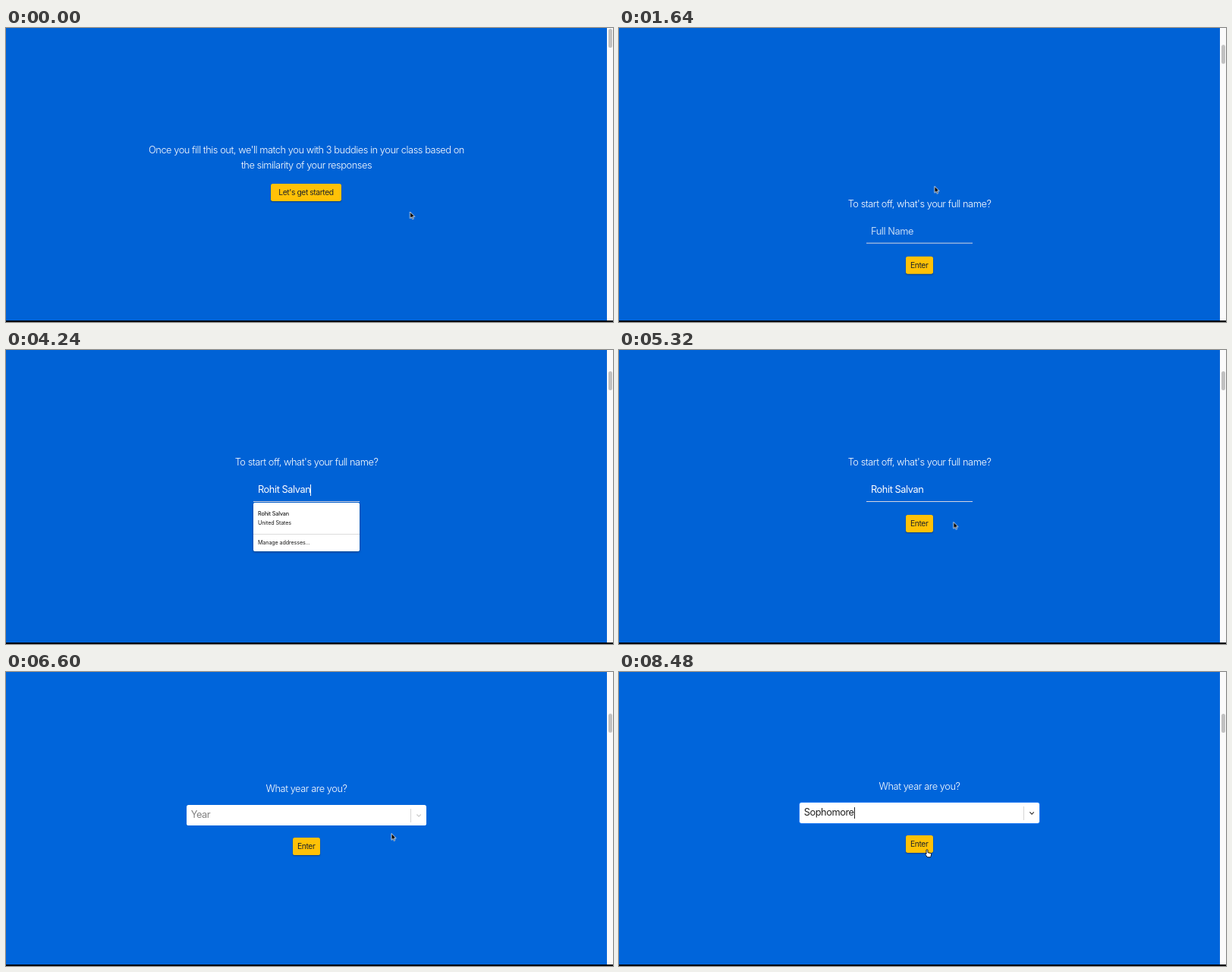
An HTML page that plays this animation: 800 px wide and 387 px high, repeating every 8.52 s.

```html
<!DOCTYPE html>
<html lang="en">
<head>
<meta charset="utf-8">
<title>Buddy form</title>
<style>
html, body { margin: 0; width: 100%; height: 100%; overflow: hidden; }
body { --loop: 8520ms; }
#stage {
  position: fixed; inset: 0; overflow: hidden;
  font: 300 12.8px/20px Inter, "Open Sans", sans-serif;
  letter-spacing: -.44px; color: #fff; cursor: default;
  background: #0062d6; animation: tint var(--loop) infinite;
}
#stage * { box-sizing: border-box; }
#page { position: absolute; inset: 0 8px 0 0; animation: scroll var(--loop) infinite; }
section { position: absolute; left: 0; width: 792px; height: 385px; }
section > * { position: absolute; }
section:nth-child(2) { top: 385px; }
section:nth-child(3) { top: 770px; }
h1 { margin: 0; width: 100%; font: inherit; text-align: center; }

.btn {
  height: 23px; border-radius: 2.7px; background: #ffc107; color: #212529;
  font-size: 10.3px; font-weight: 400; line-height: 23px; letter-spacing: -.42px;
  text-align: center; box-shadow: 0 1px 2px #0006;
}
.enter { left: 377.5px; width: 36.5px; }
#start { left: 349px; top: 204.5px; width: 93px; animation: press var(--loop) step-end infinite; }
#send { top: 217px; animation: focus var(--loop) step-end infinite; }

.field { font-weight: 400; white-space: nowrap; }
.caret { display: inline-block; width: 1px; height: 15px; margin-right: -1px; vertical-align: -3.5px; background: currentColor; opacity: 0; }
#name { left: 326px; top: 169px; width: 140px; height: 31px; padding: 5px 6px; border-bottom: 1px solid #d5d5e2; }
#name .hint { opacity: .75; }
#fill {
  left: 325.5px; top: 201px; width: 140.5px; height: 64px; border-radius: 2px;
  background: #fff; color: #1b1b1b; box-shadow: 0 1px 3px #0006;
  font-size: 7.2px; font-weight: 400; line-height: 12px; letter-spacing: -.12px;
  opacity: 0; animation: fill var(--loop) step-end infinite;
}
#fill p { margin: 0; padding: 0 6.5px; }
#fill p:first-child { padding-top: 8.5px; font-weight: 500; }
#fill p:last-child { position: absolute; top: 41px; width: 100%; border-top: 1px solid #ddd; line-height: 22px; }

#year {
  left: 238px; top: 171.5px; width: 316px; height: 27px; padding: 3.5px 5.7px;
  border-radius: 2.7px; background: #fff; color: #222;
  animation: ring var(--loop) step-end infinite;
}
#year .hint { color: #808080; }
#year svg { position: absolute; left: 295px; top: 5px; animation: chevron var(--loop) step-end infinite; }
#menu {
  left: 238px; top: 203.8px; width: 316px; padding: 2.7px 0; border-radius: 2.7px;
  background: #fff; color: #222; font-weight: 400;
  box-shadow: 0 0 0 .7px #0000001a, 0 2.7px 7px #0000001a;
  opacity: 0; animation: menu var(--loop) step-end infinite;
}
#menu div { height: 30.7px; padding: 0 8px; line-height: 30.7px; }
#menu div:nth-child(1) { animation: first var(--loop) step-end infinite; }
#menu div:nth-child(2) { animation: second var(--loop) step-end infinite; }

#track { position: absolute; right: 0; top: 0; width: 8px; height: 385px; background: #fafafa; }
#thumb { position: absolute; left: 2px; top: 1px; width: 5px; height: 24.5px; border-radius: 2.5px; background: #c1c1c1; animation: thumb var(--loop) infinite; }
#edge { position: absolute; left: 0; right: 0; top: 385px; bottom: 0; background: #05080d; }

#mouse { position: absolute; left: 0; top: 0; animation: move var(--loop) ease-in-out infinite; }
#mouse svg { position: absolute; left: 0; top: 0; overflow: visible; opacity: 0; }
#arrow { animation: arrow var(--loop) step-end infinite; }
#hand { animation: hand var(--loop) step-end infinite; }
#beam { animation: beam var(--loop) step-end infinite; }

@keyframes scroll {
  0%, 12.71% { transform: none; animation-timing-function: cubic-bezier(.455, .03, .515, .955); }
  22.55%, 68.13% { transform: translateY(-385px); animation-timing-function: cubic-bezier(.455, .03, .515, .955); }
  77.97%, 100% { transform: translateY(-770px); }
}
@keyframes thumb {
  0%, 12.71% { transform: none; animation-timing-function: cubic-bezier(.455, .03, .515, .955); }
  22.55%, 68.13% { transform: translateY(27px); animation-timing-function: cubic-bezier(.455, .03, .515, .955); }
  77.97%, 100% { transform: translateY(54px); }
}
@keyframes tint {
  0%, 70% { background: #0062d6; }
  76%, 100% { background: #0065db; }
}
@keyframes press {
  12.21%, 23% { background: #e5b012; color: #7a6f45; box-shadow: 0 0 0 1px #fff, inset 0 0 0 1px #26303c; }
  23.1% { background: #ffc107; }
}
@keyframes focus {
  67.61%, 99.9% { box-shadow: 0 0 0 1px #fff, inset 0 0 0 1px #26303c; }
}
@keyframes fill { 0%, 57.98%, 100% { opacity: 0; } 26.29% { opacity: 1; } }
@keyframes menu { 0%, 94.84%, 100% { opacity: 0; } 80.99% { opacity: 1; } }
@keyframes ring { 0% { box-shadow: none; } 80.99%, 100% { box-shadow: 0 0 0 .7px #2684ff; } }
@keyframes chevron { 0% { color: #ccc; } 80.99%, 100% { color: #333; } }
@keyframes first { 0%, 86.85% { background: #fff; } 80.99% { background: #deebff; } }
@keyframes second { 0% { background: #fff; } 86.85%, 100% { background: #deebff; } }
@keyframes move {
  0% { transform: translate(532.5px, 242px); }
  10.56%, 16.43% { transform: translate(411px, 213px); }
  24.65%, 53.52% { transform: translate(430.5px, 194px); }
  57.04%, 58.69% { transform: translate(513px, 222px); }
  64.55%, 72.18% { transform: translate(414.5px, 228px); }
  77.46% { transform: translate(508px, 212.5px); }
  80.4%, 83.92% { transform: translate(500px, 188px); }
  88.03% { transform: translate(470px, 250px); }
  94.84% { transform: translate(440px, 252px); }
  99.06%, 100% { transform: translate(406px, 234px); }
}
@keyframes arrow {
  0%, 14.04%, 54.46%, 69.48% { opacity: 1; }
  6.87%, 22.89%, 63.85%, 97.89%, 100% { opacity: 0; }
}
@keyframes hand {
  0%, 14.04%, 69.48% { opacity: 0; }
  6.87%, 63.85%, 97.89%, 100% { opacity: 1; }
}
@keyframes beam {
  0%, 31.92%, 54.46%, 100% { opacity: 0; }
  22.89%, 53.52% { opacity: 1; }
}
</style>
</head>
<body>
<div id="stage">
  <div id="page">
    <section>
      <h1 style="top:151px">Once you fill this out, we'll match you with 3 buddies in your class based on<br>the similarity of your responses</h1>
      <div class="btn" id="start">Let's get started</div>
    </section>
    <section>
      <h1 style="top:138px">To start off, what's your full name?</h1>
      <div class="field" id="name"><span class="value"></span><i class="caret"></i><span class="hint">Full Name</span></div>
      <div class="btn enter" id="send">Enter</div>
      <div id="fill"><p>Rohit Salvan</p><p>United States</p><p>Manage addresses...</p></div>
    </section>
    <section>
      <h1 style="top:140.5px">What year are you?</h1>
      <div class="field" id="year">
        <span class="value"></span><i class="caret"></i><span class="hint">Year</span>
        <svg width="20" height="18" fill="none">
          <path d="M.5 0V18" stroke="#ccc" stroke-width=".8"/>
          <path d="M8.4 7.4l2.7 2.7 2.7-2.7" stroke="currentColor" stroke-width="1.2"/>
        </svg>
      </div>
      <div class="btn enter" style="top:215px">Enter</div>
      <div id="menu"><div>Freshman</div><div>Sophomore</div><div>Junior</div><div>Senior</div><div>Graduate</div></div>
    </section>
  </div>
  <div id="track"><div id="thumb"></div></div>
  <div id="edge"></div>
  <div id="mouse">
    <svg id="arrow" width="8" height="11"><path d="M0 0V8.6L2 6.8 3.3 9.8 4.7 9.2 3.4 6.3H6.2Z" fill="#000" stroke="#fff" stroke-width=".8"/></svg>
    <svg id="hand" width="10" height="12"><path transform="translate(-3 -1)" d="M3 .7c.7 0 1 .4 1 1v3l3.2.7c1 .2 1.4.8 1.3 1.7l-.4 2.4-.6 1.3H3.6L1 7.6c-.5-.6.2-1.4 1-.9V1.7c0-.6.3-1 1-1z" fill="#fff" stroke="#000" stroke-width=".9"/></svg>
    <svg id="beam" width="6" height="12" fill="none"><g id="stem"><path d="M-2.5-5.5Q0-5.5 0-4V4Q0 5.5-2.5 5.5M2.5-5.5Q0-5.5 0-4V4Q0 5.5 2.5 5.5M-1.5 2H1.5" stroke="#fff" stroke-width="2"/><path d="M-2.5-5.5Q0-5.5 0-4V4Q0 5.5-2.5 5.5M2.5-5.5Q0-5.5 0-4V4Q0 5.5 2.5 5.5M-1.5 2H1.5" stroke="#000" stroke-width=".9"/></g></svg>
  </div>
</div>
<script>
const LOOP = 8520;
// step is the time per typed letter; 0 puts the whole text in at once
const fields = [
  { id: "name", text: "Rohit Salvan", focus: 2240, type: 2720, step: 120, blur: 4940 },
  { id: "year", text: "Sophomore", focus: 6900, type: 8080, step: 0, blur: LOOP },
].map(f => {
  const part = name => document.querySelector(`#${f.id} .${name}`);
  return { ...f, value: part("value"), caret: part("caret"), hint: part("hint") };
});

function typedCount(f, t) {
  if (t < f.type) return 0;
  if (!f.step) return f.text.length;
  return Math.min(f.text.length, 1 + Math.floor((t - f.type) / f.step));
}

function draw() {
  const t = (document.timeline.currentTime ?? performance.now()) % LOOP;
  for (const f of fields) {
    const n = typedCount(f, t);
    const lastKey = n ? f.type + (n - 1) * f.step : f.focus;
    const lit = t >= f.focus && t < f.blur && (t - lastKey) % 1000 < 500;
    f.value.textContent = f.text.slice(0, n);
    f.hint.style.display = n ? "none" : "";
    f.caret.style.opacity = lit ? 1 : 0;
  }
  requestAnimationFrame(draw);
}
draw();
</script>
</body>
</html>
```
